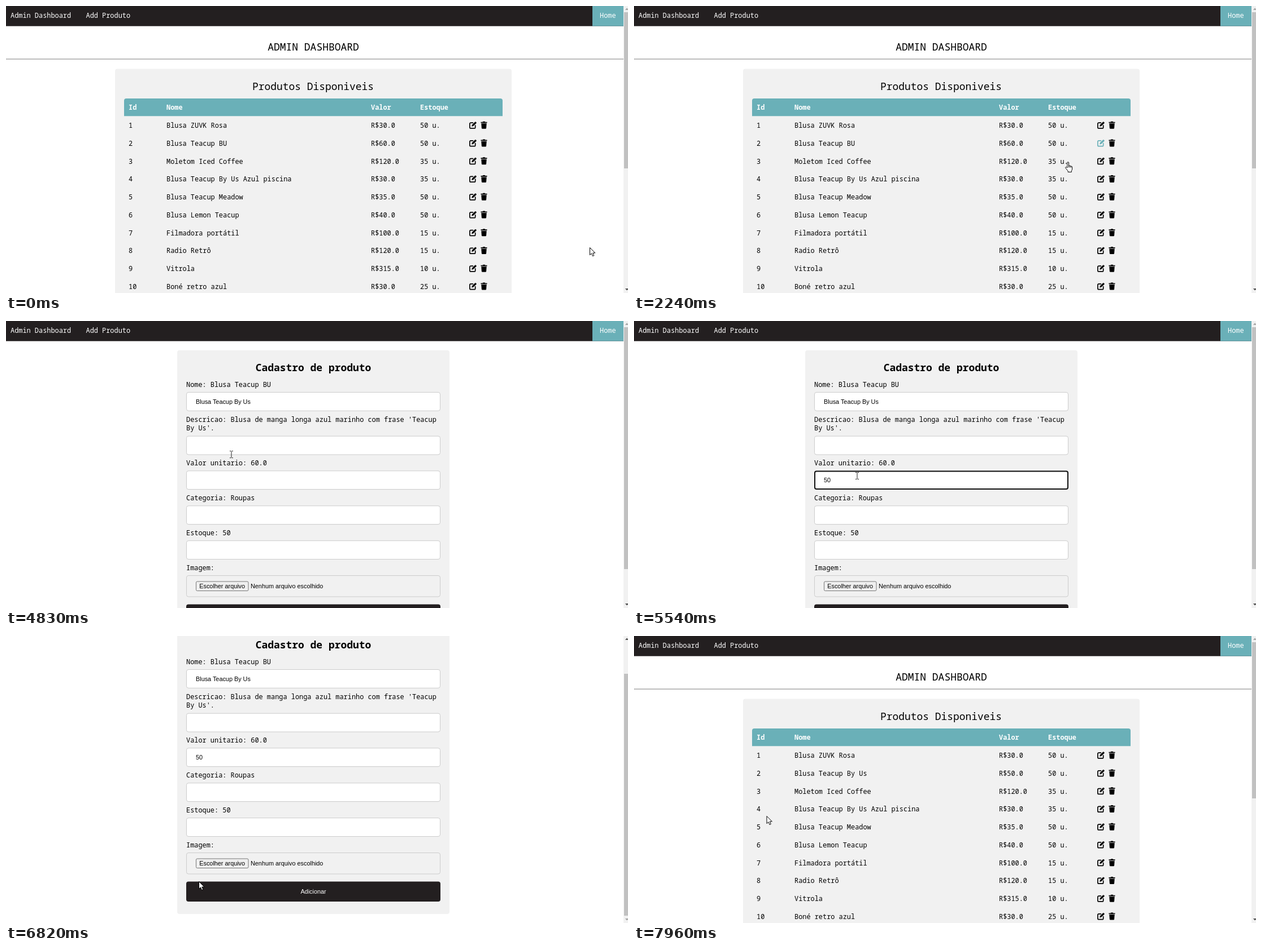
Recreate the animation shown at these times as an HTML page. Size 1101x509 px, loop 9210 ms.

```html
<!DOCTYPE html>
<html lang="pt">
<head>
<meta charset="utf-8">
<title>Admin Dashboard</title>
<style>
  html, body { margin: 0; width: 100%; height: 100%; overflow: hidden; background: #fff; }
  svg { display: block; width: 100%; height: 100%; }
  text { font: 11.92px "Noto Sans Mono", monospace; fill: #000; }
  .title { font-size: 17.95px; text-anchor: middle; }
  .bold { font-weight: 700; }
  .white { fill: #fff; }
  .nav { font-weight: 500; }
  .ui { font: 10.85px "Liberation Sans", Arial, sans-serif; }
  .status { font: 9.2px "Open Sans", sans-serif; fill: #fff; }
  .field { fill: #fff; stroke: #ccc; }
  .cursor { fill: #fff; stroke: #000; stroke-linejoin: round; }
</style>
</head>
<body>
<svg id="stage" viewBox="0 0 1101 509"></svg>
<script>
const LOOP = 9210, TEAL = '#6ab0b8', DARK = '#231f20', PANEL = '#f1f1f1', SCROLL = 67;

const rect = (x, y, w, h, fill, extra = '') =>
  `<rect x="${x}" y="${y}" width="${w}" height="${h}" fill="${fill}" ${extra}/>`;
const text = (x, y, str, cls = '', extra = '') =>
  `<text x="${x}" y="${y}" class="${cls}" ${extra}>${str}</text>`;

const products = [
  ['Blusa ZUVK Rosa', '30.0', 50],
  ['Blusa Teacup BU', '60.0', 50],
  ['Moletom Iced Coffee', '120.0', 35],
  ['Blusa Teacup By Us Azul piscina', '30.0', 35],
  ['Blusa Teacup Meadow', '35.0', 50],
  ['Blusa Lemon Teacup', '40.0', 50],
  ['Filmadora portátil', '100.0', 15],
  ['Radio Retrô', '120.0', 15],
  ['Vitrola', '315.0', 10],
  ['Boné retro azul', '30.0', 25],
];

const pencil = (x, y, id) => `<g id="edit${id}" transform="translate(${x} ${y})" color="#000">
  <path d="M6.5 2.3H2.6A1.7 1.7 0 0 0 .9 4v6.4a1.7 1.7 0 0 0 1.7 1.7H9a1.7 1.7 0 0 0 1.7-1.7V7"
    fill="none" stroke="currentColor" stroke-width="1.7" stroke-linecap="round"/>
  <path d="M4.2 8.9l.7-2.9L10 .9a1.3 1.3 0 0 1 1.8 0l.6.5a1.3 1.3 0 0 1 0 1.8L7.1 8.2z" fill="currentColor"/></g>`;
const trash = (x, y) => `<path transform="translate(${x} ${y})"
  d="M0 .9h3.2l.5-.9h3.6l.5.9H11v1.7H0zM.8 3.4h9.4l-.6 8.4a1.3 1.3 0 0 1-1.3 1.2H2.7a1.3 1.3 0 0 1-1.3-1.2z"/>`;

function row([name, price, stock], i) {
  const y = 216 + 31.75 * i, id = i + 1;
  return text(217, y, id) + text(284, y, name, '', `id="name${id}"`) +
    text(646, y, 'R$' + price, '', `id="price${id}"`) + text(733, y, stock + ' u.') +
    pencil(820, y - 11.2, id) + trash(840.5, y - 11.2);
}

const nav = rect(0, 0, 1093, 35.7, DARK) + rect(1038, 0, 55, 35.7, TEAL) +
  text(8, 21, 'Admin Dashboard', 'nav white') + text(141.5, 21, 'Add Produto', 'nav white') +
  text(1051, 21, 'Home', 'nav white');

const dashboard = text(544, 78.5, 'ADMIN DASHBOARD', 'title') +
  rect(0, 93.5, 1093, 1.2, '#929292') +
  rect(193, 111.5, 702, 420, PANEL, 'rx="4"') +
  text(543.5, 148.5, 'Produtos Disponiveis', 'title') +
  `<path d="M209 195.3V168q0-4 4-4h662q4 0 4 4v27.3z" fill="${TEAL}"/>` +
  [[217, 'Id'], [284, 'Nome'], [646, 'Valor'], [733, 'Estoque']]
    .map(([x, label]) => text(x, 184.3, label, 'bold white')).join('') +
  products.map(row).join('');

const labels = [
  [117, 'Nome: Blusa Teacup BU'],
  [179, "Descricao: Blusa de manga longa azul marinho com frase 'Teacup"],
  [194, "By Us'."],
  [256, 'Valor unitario: 60.0'],
  [318, 'Categoria: Roupas'],
  [380, 'Estoque: 50'],
  [442, 'Imagem:'],
];
const form = rect(303, 52, 482, 508, PANEL, 'rx="4"') +
  text(544, 89, 'Cadastro de produto', 'title bold') +
  labels.map(([y, label]) => text(319, y, label)).join('') +
  [126.5, 204.2, 265.8, 327.8, 389.7]
    .map(y => rect(319.5, y, 449, 32.8, '#fff', 'class="field" rx="3.5"')).join('') +
  rect(320, 266.5, 448, 31.5, 'none', 'id="focus" stroke="#101010" stroke-width="2" rx="3"') +
  text(336, 147, 'Blusa Teacup By Us', 'ui', 'id="typedName"') +
  text(336, 286, '', 'ui', 'id="typedPrice"') +
  rect(319.5, 451.5, 449, 37.5, 'none', 'stroke="#ccc" rx="3.5"') +
  rect(336.5, 462, 92.5, 16.5, '#efefef', 'stroke="#767676" rx="2"') +
  text(342.3, 474, 'Escolher arquivo', 'ui') + text(433, 474, 'Nenhum arquivo escolhido', 'ui') +
  rect(319, 502.5, 450, 35.5, DARK, 'id="submit" rx="4"') +
  text(544, 524.2, 'Adicionar', 'ui white', 'text-anchor="middle"');

const scrollbar = rect(1093, 0, 8, 509, PANEL) +
  rect(1094, 11, 7, 277, '#c1c1c1', 'id="thumb"') +
  '<path id="up" d="M1096 7h6l-3-3.5z"/><path id="down" d="M1096 501h6l-3 3.5z"/>';

const status = `<g id="status">${rect(-5, 493, 165.5, 20, '#505050', 'rx="3"')}
  ${text(0, 505, '127.0.0.1:5000/admin/att_produto/2', 'status')}</g>`;

const cursors = `
  <path id="arrow" class="cursor" d="M.5 .5V13.6L3.5 10.8L5.5 15.6L7.8 14.6L5.8 10H9.9Z"/>
  <path id="hand" class="cursor" d="M4 11V2a1.3 1.3 0 0 1 2.6 0V7.2q1.9-.8 2.3.5q1.7-.5 2 .6q1.7-.2 1.7 1.4V13
    q0 2-1.2 3.2v2.3H5.2v-2L1 11.5q-.9-1.6.6-2q1.2 0 2.4 1.5zM6.6 7v3.5M8.9 8v2.5M10.9 8.5v2"/>
  <path id="ibeam" d="M0 .5H2.4M3.6 .5H6M3 1V12M0 12.5H2.4M3.6 12.5H6" fill="none" stroke="#222"/>`;

document.getElementById('stage').innerHTML =
  `<g id="page">${nav}<g id="dashboard">${dashboard}</g><g id="form">${form}</g></g>` +
  scrollbar + status + cursors;

// Pointer path: time, left, top, shape
const path = [
  [0, 1033, 428, 'arrow'], [50, 1033, 428, 'arrow'], [450, 930, 345, 'arrow'],
  [720, 799, 256, 'arrow'], [930, 816, 248, 'arrow'],
  [980, 818, 246, 'hand'], [1790, 818, 246, 'hand'], [2240, 763, 276, 'hand'],
  [2410, 763, 276, 'ibeam'], [2800, 763, 276, 'ibeam'], [3330, 744, 286, 'ibeam'],
  [3580, 720, 286, 'ibeam'], [3800, 660, 252, 'ibeam'], [4290, 498, 141, 'ibeam'],
  [4449, 498, 141, 'ibeam'], [4450, 400, 192, 'ibeam'], [4610, 400, 192, 'ibeam'],
  [5050, 392, 268, 'ibeam'], [5870, 392, 268, 'ibeam'],
  [6100, 318, 286, 'arrow'], [6260, 276, 298, 'arrow'], [6600, 276, 298, 'arrow'],
  [6820, 341, 435, 'arrow'], [7150, 336, 432, 'hand'], [7370, 336, 432, 'hand'],
  [7400, 330, 420, 'arrow'], [7730, 234.5, 319, 'arrow'], [LOOP, 234.5, 319, 'arrow'],
];

const el = id => document.getElementById(id);
const show = (id, on) => el(id).setAttribute('visibility', on ? 'visible' : 'hidden');
const set = (id, name, value) => el(id).setAttribute(name, value);
const ramp = (t, from, to) => Math.min(1, Math.max(0, (t - from) / (to - from)));

function drawPointer(t) {
  const next = path.findIndex(key => key[0] > t);
  const [t0, x0, y0, shape] = path[next - 1], [t1, x1, y1, shape1] = path[next];
  const held = shape !== shape1 && t1 - t0 > 300;
  const k = held ? 0 : ramp(t, t0, t1);
  for (const id of ['arrow', 'hand', 'ibeam']) show(id, id === shape);
  set(shape, 'transform', `translate(${x0 + (x1 - x0) * k} ${y0 + (y1 - y0) * k})`);
}

function draw(t) {
  const onForm = t >= 2410 && t < 7960, saved = t >= 7960;
  const k = ramp(t, 6440, 6660), scrolled = onForm ? k * k * (3 - 2 * k) : 0;

  set('page', 'transform', `translate(0 ${-SCROLL * scrolled})`);
  el('dashboard').style.display = onForm ? 'none' : '';
  el('form').style.display = onForm ? '' : 'none';
  set('thumb', 'y', 11 + 56 * scrolled);
  set('thumb', 'height', onForm ? 429 : 277);
  set('up', 'fill', scrolled > 0 ? '#505050' : '#a3a3a3');
  set('down', 'fill', scrolled === 1 ? '#a3a3a3' : '#505050');

  el('name2').textContent = saved ? 'Blusa Teacup By Us' : 'Blusa Teacup BU';
  el('price2').textContent = saved ? 'R$50.0' : 'R$60.0';
  set('edit2', 'color', t >= 980 && t < 2410 ? TEAL : '#000');
  set('status', 'opacity', t < 1310 ? 0 : (0.5 + 0.5 * ramp(t, 1310, 1570)) * (1 - ramp(t, 1950, 2200)));

  el('typedName').style.display = t >= 4450 ? '' : 'none';
  el('typedPrice').textContent = t < 5210 ? '' : t < 5540 ? '5' : '50';
  el('focus').style.display = t >= 5050 && t < 6260 ? '' : 'none';
  set('submit', 'fill', t >= 6900 && t < 7400 ? TEAL : DARK);
  drawPointer(t);
}

function tick(now) {
  draw(now % LOOP);
  requestAnimationFrame(tick);
}
draw(0);
requestAnimationFrame(tick);
</script>
</body>
</html>
```
